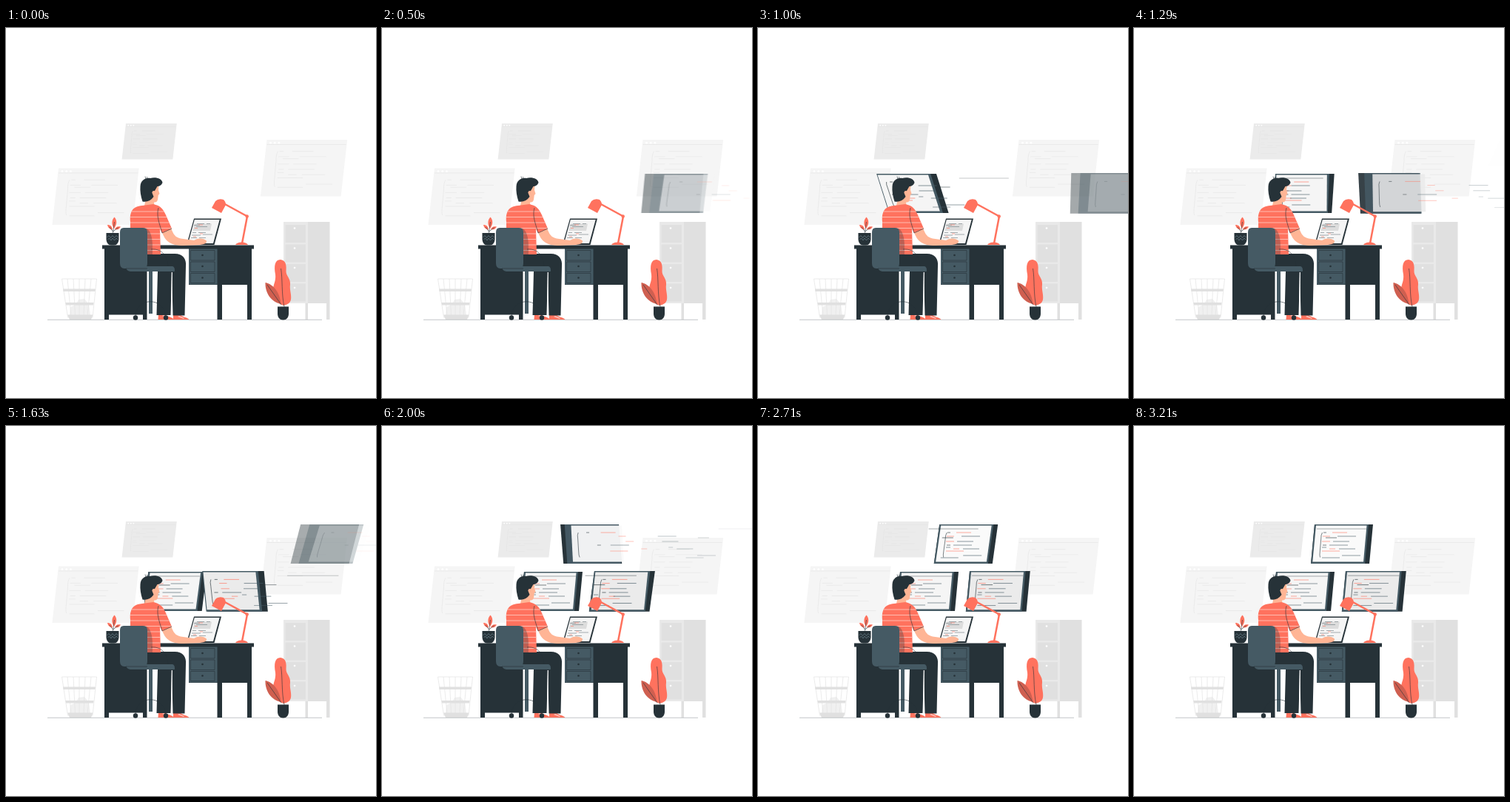
Animation, 500 px wide and 500 px high, one loop 3.79 s. Source, as an HTML page:

```html
<!DOCTYPE html>
<html lang="en">
<head>
<meta charset="utf-8">
<title>Developer at a desk</title>
<style>
html, body { margin: 0; width: 100%; height: 100%; overflow: hidden; background: #fff; }
svg { display: block; width: 100%; height: 100%; }
.d { fill: #263238; } .b { fill: #455a64; } .c { fill: #ff725e; } .s { fill: #ffb595; }
.l { fill: none; stroke: #263238; stroke-width: .6; }
.g { fill: none; stroke: #e3e3e3; stroke-width: .7; }
</style>
</head>
<body>
<svg viewBox="0 0 500 500">
  <defs>
    <clipPath id="shirt"><path d="M168 262C167 248 171 241 184 240L199 238C209 240 213 245 217 255L224 271 211 277 208 271 209 306H168Z"/></clipPath>
  </defs>

  <g id="cards"></g>

  <!-- filing cabinet -->
  <path fill="#e0e0e0" d="M375 262H437.500V394H433V372H408V394H404.500V372H375Z"/>
  <path fill="#e9e9e9" d="M375 262H408V372H375Z"/>
  <path fill="#e0e0e0" d="M377.500 266H405V290H377.500ZM377.500 292.500H405V316.500H377.500ZM377.500 319H405V343H377.500ZM377.500 345.500H405V369.500H377.500Z"/>
  <g fill="#fff"><circle cx="390" cy="270.500" r="1.300"/><circle cx="390" cy="297.500" r="1.300"/><circle cx="390" cy="324" r="1.300"/><circle cx="390" cy="351" r="1.300"/></g>

  <!-- paper bin -->
  <path fill="#f0f0f0" d="M86 388L87 377 94 374 98 367 106 366 112 373 114 388Z"/>
  <path class="g" d="M75.500 339H122.500L117 391H83.500ZM83 339L88 389M91 339L93.500 389M99 339V389M107 339L105 389M115 339L110 389"/>
  <path fill="#e0e0e0" d="M77 352.500H121L120.500 356H77.500ZM80.500 371H118.500L118 374.500H81ZM83 387.500H117.500L115 394H86Z"/>

  <g id="screens"></g>

  <path fill="none" stroke="#b4b9bb" stroke-width=".8" d="M56 394.300H427"/>

  <!-- desk -->
  <path class="d" d="M130 293.500H335V298.500H332V394H326V347H292V394H285.500V347H247V298.500H190.500V394H185V387.500H139V394H133V298.500H130Z"/>
  <path class="b" d="M247 298.500H285.500V346.500H247Z"/>
  <path class="l" d="M249.500 300.500H282V314H249.500ZM249.500 316H282V329.500H249.500ZM249.500 331.500H282V344.500H249.500Z"/>
  <g class="d"><circle cx="265.500" cy="307" r="1.300"/><circle cx="265.500" cy="322" r="1.300"/><circle cx="265.500" cy="337.500" r="1.300"/></g>

  <!-- desk plant -->
  <path class="c" d="M146 271C142 265 143 259 146.500 255.500C150.500 260 150 266 146 271ZM144 272.500C140 272 138 270 137 266C141 266 143.500 268 144 272.500ZM147 272C148 268.500 151 267.500 155 268.500C153 272 150.500 273 147 272Z"/>
  <path class="l" d="M146.500 262L144.500 277M140 269L144.500 275L152 269.500"/>
  <path class="d" d="M135.500 277H152.500V285C152.500 290 149.500 293.500 146 293.500H142C138.500 293.500 135.500 290 135.500 285Z"/>
  <path fill="none" stroke="#78909c" stroke-width=".6" d="M136.500 283L139 280.500 141.500 283.500 144 280.500 146.500 283.500 149 280.500 151.500 283M137.500 286L139.500 284 142 287 144 284 146.500 287 149 284 151 286"/>

  <!-- floor plant -->
  <path class="c" d="M375 375C363 371 360 362 361 353C361.500 345 365 342 364 333C362 322 363 313 371 313C379 314 379 322 378.500 328C378 335 385 338 384 347C383 354 386 360 385 367C384 372 380 374 375 375Z"/>
  <path fill="#cf5f50" d="M371.500 373C358 370 350 358 350.500 344C361 346 370 357 371.500 373Z"/>
  <path class="l" d="M371.500 325C374 340 372 358 376 377M353 347L372 374"/>
  <path class="d" d="M367 376.500H382V386C382 391 379 394.500 374.500 394.500C370 394.500 367 391 367 386Z"/>

  <!-- laptop -->
  <path class="d" d="M254 257.500H291L281.500 293H244Z"/>
  <path fill="#f5f5f5" d="M254.800 259H288.700L280 291H246Z"/>
  <path fill="#dcdcdc" d="M254.500 264.500H278L276 274H252.500Z"/>
  <path fill="none" stroke="#6c777c" stroke-width=".6" d="M258 264.500H268M271 264.500H276M254 266.500H262M257 268.500H272M260 276.500H270M252 276.500H257M251 280H263M266 279H279M250 283.500H258M261 283.500H270"/>
  <path fill="none" stroke="#ff725e" stroke-width=".6" d="M260 266H266M255 270.500H259M262 278H266M253 282H257"/>

  <!-- lamp -->
  <path fill="none" stroke="#ff725e" stroke-width="2.500" stroke-linejoin="round" d="M294 237L326 254.500L319 291"/>
  <path class="c" d="M278 243L283 234Q287 230 294 232Q298 236 296.500 240L291 250ZM310 293Q312 289.500 318.500 289.500Q325 289.500 327 293Z"/>
  <circle class="c" cx="325.700" cy="254.500" r="2.200"/>

  <!-- legs and shoes -->
  <path class="c" d="M206 387H214C218 390 223 390 226 393V394H205.500ZM226 388H236C240 391 245 391 247.500 394H226Z"/>
  <path fill="#fff" opacity=".6" d="M213 388L219 391 218 392 211 389ZM234 389L241 392 240 393 232 390Z"/>
  <path class="d" d="M190 305H228C239 305 244 312 243 322L241.500 388.500H225.500L224 329L222.500 388H203.500L205 329H190Z"/>
  <path fill="none" stroke="#fff" stroke-width="1.200" d="M224.300 330L223.500 388"/>

  <!-- torso, arm and head -->
  <path class="s" d="M211 276L223 270C226 279 229 283 236 284.500L254 287C260 283 267 284 271 287.500Q272 292 262 293L240 294C222 294 215 288 211 276Z"/>
  <path class="s" d="M190 226H197V212H206.500L206 219 207.500 224 205.800 226 205 232Q204 236 200 235.500L200.500 240Q195 245 187 240Z"/>
  <g clip-path="url(#shirt)">
    <path class="c" d="M165 235H228V308H165Z"/>
    <path fill="none" stroke="#ffc4b9" stroke-width=".9" d="M165 248H228M165 255.500H228M165 263H228M165 270.500H228M165 278H228M165 285.500H228M165 293H228M165 300.500H228"/>
    <path class="d" opacity=".3" d="M184 270H187C195 271 198 282 198 296V324H184Z"/>
  </g>
  <path class="l" d="M206 243C203 254 207 263 211 277L224 271"/>
  <path class="d" d="M181.500 214C182 206 188 202 195 203C203 201 211 204 211.500 209C210 213 206.500 214 204.500 214L201 220 198 224 199.500 228Q194 236 184.500 234.500C182 227 181 220 181.500 214Z"/>
  <path class="l" d="M189 204L188 200.500M191 204L190.500 201"/>
  <circle class="s" cx="199.800" cy="222.500" r="2.400"/>

  <!-- chair -->
  <path class="b" d="M159 270H185Q191 270 191 276V318Q191 325 185 325H160Q154 325 154 318V276Q154 270 159 270Z"/>
  <path class="l" d="M196 299C208 298 217 304 219 322"/>
  <path class="b" d="M162 322H225Q228.500 323 228 329H168Q162 328 162 322ZM193 329H198V386H193Z"/>
  <path class="l" d="M162 325H191"/>
  <path class="l" stroke-width=".9" d="M175 390C176 363 214 363 216 390"/>
  <circle class="d" cx="175" cy="391.500" r="3.200"/><circle class="d" cx="216" cy="391.500" r="3.200"/>
</svg>
<script>
const LOOP = 3790, FPS = 24, LENGTH = 1867, LEAD = 20, STAGGER = 24.4, SCREEN_GAP = 633;
const INK = '#263238', SLATE = '#455a64', RED = '#ff725e';
const NS = 'http://www.w3.org/2000/svg';

// rows of code: x start, x end, y, colour, in order of arrival
const rows = [
  [12, 16, 11, INK], [24, 44, 11, RED], [11, 16, 28, INK], [20, 45, 28, SLATE],
  [10, 34, 36, RED], [11, 21, 16, RED], [10, 21, 23, RED], [20, 28, 33, RED],
  [31, 56, 16, SLATE], [25, 47, 23, SLATE], [33, 55, 33, SLATE], [10, 16, 31, SLATE],
  [37, 62, 42, SLATE], [10, 34, 45, SLATE], [15, 30, 18, INK]
];
const BRACE = 'M10.500 11Q8.500 14 8.700 20L8 28 7.300 36Q6.500 42 7.500 44.500';

function add(parent, tag, attrs) {
  const el = document.createElementNS(NS, tag);
  for (const name in attrs) el.setAttribute(name, attrs[name]);
  return parent.appendChild(el);
}
const stroke = (parent, d, colour, width) =>
  add(parent, 'path', { d, fill: 'none', stroke: colour, 'stroke-width': width });

// pale windows on the wall
function card(x, y, scale, fill, line) {
  const g = add(cards, 'g', { transform: `translate(${x},${y}) scale(${scale})` });
  add(g, 'path', { d: 'M0 0H76L70 53.500H-6Z', fill });
  stroke(g, 'M0 4.500H75', line, .5);
  for (const cx of [3.5, 7.5, 11.5]) add(g, 'circle', { cx, cy: 2.9, r: 1, fill: '#fff' });
  stroke(g, BRACE, line, .5);
  for (const [a, b, v] of rows) stroke(g, `M${a} ${v}H${b}`, line, .5);
}
const cards = document.getElementById('cards');
card(71, 189.5, 1.43, '#f5f5f5', '#e6e6e6');
card(162, 129, .905, '#ebebeb', '#e0e0e0');
card(352.500, 151, 1.43, '#f5f5f5', '#e6e6e6');

// monitors: every part flies in on its own delay
const screens = document.getElementById('screens');
const parts = [];
function monitor(order, x, y, scale, face) {
  const g = add(screens, 'g', { transform: `translate(${x},${y}) scale(${scale})` });
  const part = (el, cy, slot) =>
    parts.push({ el, cy, scale, start: order * SCREEN_GAP + slot * STAGGER });
  const shape = (d, fill, slot) => part(add(g, 'path', { d, fill }), 26.5, slot);
  shape('M0 0H79L74 53H-5Z', INK, 0);
  shape('M0 0H73L68 53H-5Z', SLATE, 1);
  shape('M2 1.500H70.500L66 50.500H-2.700Z', face, 2);
  part(stroke(g, BRACE, INK, .6), 28, 2);
  rows.forEach(([a, b, v, colour], i) => part(stroke(g, `M${a} ${v}H${b}`, colour, .6), v, i + 3));
  part(stroke(g, 'M3 6H70', INK, .4), 6, 21);
}
monitor(0, 192, 197, 1, '#f5f5f5');
monitor(1, 286, 196, 1.035, '#ebebeb');
monitor(2, 244, 133, 1, '#fafafa');

// cubic-bezier(.36, -.01, .5, 1.38)
const curve = (t, a, b) => 3 * (1 - t) ** 2 * t * a + 3 * (1 - t) * t * t * b + t ** 3;
function ease(x) {
  let lo = 0, hi = 1;
  for (let i = 0; i < 22; i++) {
    const mid = (lo + hi) / 2;
    if (curve(mid, .36, .5) < x) lo = mid; else hi = mid;
  }
  return curve(lo, -.01, 1.38);
}

// time, shift, skew in degrees, opacity
const keys = [[0, 250, -20, 0], [.6, 0, 10, 1], [.8, 0, -2, 1], [1, 0, 0, 1]];
const slope = deg => Math.tan(deg * Math.PI / 180);
function pose(ms) {
  const x = Math.min(1, Math.max(0, ms / LENGTH));
  const i = x < .6 ? 0 : x < .8 ? 1 : 2;
  const [t0, s0, k0, o0] = keys[i], [t1, s1, k1, o1] = keys[i + 1];
  const p = ease((x - t0) / (t1 - t0));
  const mix = (a, b) => a + (b - a) * p;
  return {
    shift: mix(s0, s1),
    skew: mix(slope(k0), slope(k1)),
    opacity: Math.min(1, Math.max(0, mix(o0, o1)))
  };
}
function place(el, ms, cy, scale) {
  const { shift, skew, opacity } = pose(ms);
  el.setAttribute('transform', `matrix(1,0,${skew},1,${shift / scale - cy * skew},0)`);
  el.setAttribute('opacity', opacity);
}

function draw(now) {
  const ms = Math.floor((now % LOOP + 4) * FPS / 1000) * 1000 / FPS + LEAD;
  place(screens, ms, 192, 1);
  for (const { el, cy, scale, start } of parts) place(el, ms - start, cy, scale);
}
const begin = performance.now();
function tick() {
  draw(performance.now() - begin);
  requestAnimationFrame(tick);
}
tick();
</script>
</body>
</html>
```
